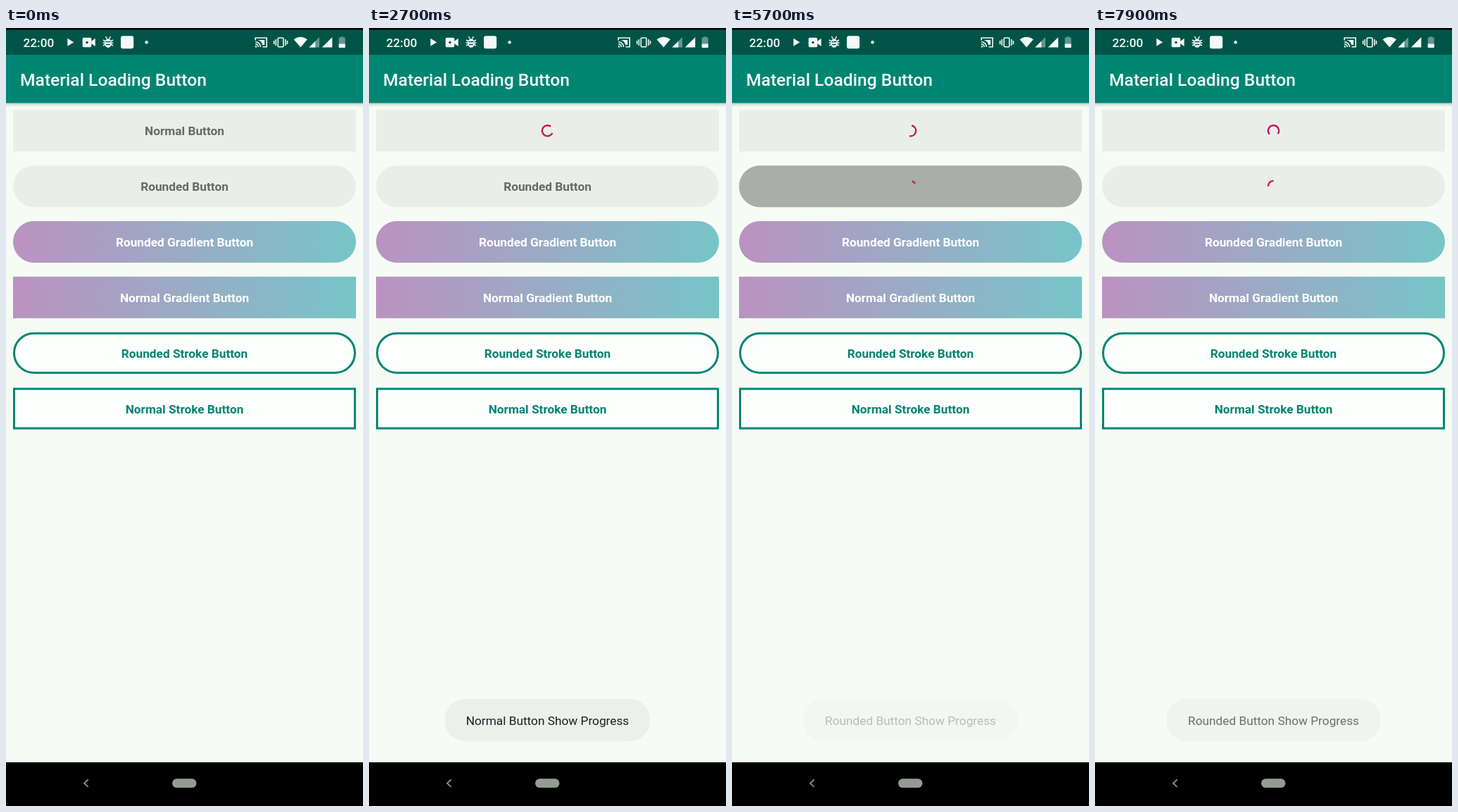
Animation, 507 px wide and 1104 px high, one loop 8 s. Source, as an HTML page:

```html
<!DOCTYPE html>
<html lang="en">
<head>
<meta charset="utf-8">
<title>Material Loading Button</title>
<style>
  html, body { margin: 0; width: 100%; height: 100%; overflow: hidden; background: #f6fbf6; }
  svg { display: block; width: 100%; height: 100%; }
  text { font-family: Roboto, "Noto Sans", sans-serif; font-size: 17.26px; }
  .label { font-weight: 700; text-anchor: middle; }
  .toast text { text-anchor: middle; fill: #1d1f1d; }
  .spinner { fill: none; stroke: #c8185c; stroke-width: 2.4; stroke-linecap: square; }
</style>
</head>
<body>
<svg id="stage" viewBox="0 0 507 1104" preserveAspectRatio="none">
  <defs>
    <linearGradient id="blend">
      <stop offset="0" stop-color="#bb92c1"/>
      <stop offset="1" stop-color="#77c5c8"/>
    </linearGradient>
    <linearGradient id="shade" x2="0" y2="1">
      <stop offset="0" stop-color="#4a6660" stop-opacity=".3"/>
      <stop offset="1" stop-color="#4a6660" stop-opacity="0"/>
    </linearGradient>
  </defs>

  <rect width="507" height="1104" fill="#f6fbf6"/>
  <rect y="106" width="507" height="6" fill="url(#shade)"/>
  <rect y="38" width="507" height="68.5" fill="#008573"/>
  <rect width="507" height="38" fill="#005548"/>
  <rect width="507" height="2.5" fill="#000"/>
  <text x="20" y="81.5" fill="#f4fbf8" style="font-size:24.65px;font-weight:500">Material Loading Button</text>

  <g id="status" fill="#f4faf7">
    <text x="24.5" y="26.7" style="font-weight:500">22:00</text>
    <path d="M87.3 14.8V25.8L96.3 20.3Z"/>
    <path d="M110.500 13.800H119.500Q121.300 13.800 121.300 15.600V18.800L126.700 14.800V26L121.300 22V25.400Q121.300 27.200 119.500 27.200H110.500Q108.700 27.200 108.700 25.400V15.600Q108.700 13.800 110.500 13.800Z"/>
    <circle cx="115" cy="20.500" r="1.800" fill="#005548"/>
    <g>
      <ellipse cx="145" cy="21.500" rx="4.800" ry="6.300"/>
      <path d="M141.500 12L143.500 15.500M148.500 12L146.500 15.500M138 17L152 25M152 17L138 25M137.600 21H152.400" fill="none" stroke="#f4faf7" stroke-width="1.500"/>
      <path d="M141.500 19.500H148.500M142 23.500H148" stroke="#005548" stroke-width="1.300"/>
    </g>
    <rect x="163" y="11.200" width="18.200" height="18" rx="3"/>
    <circle cx="199.600" cy="20.300" r="2.200"/>
    <g fill="none" stroke="#f4faf7" stroke-width="1.600">
      <path d="M354.200 17.500V14H370.200V26.800H364.500M354.200 19.700A7.300 7.300 0 0 1 361.500 27M354.200 22.900A4.100 4.100 0 0 1 358.300 27"/>
      <rect x="386.300" y="14" width="7.600" height="12.800" rx="1"/>
      <path d="M383.300 16V25M380.700 18V23M396.900 16V25M399.500 18V23"/>
    </g>
    <path d="M357.500 17H367.200V24H364.300A9 9 0 0 0 357.500 17ZM354 25A2.200 2.200 0 0 1 356.200 27.400H354Z"/>
    <path d="M408.700 16.300A14.500 14.500 0 0 1 427.900 16.300L418.300 27.500Z"/>
    <path d="M445 13V27.500H430.500Z" opacity=".4"/>
    <path d="M439.300 18.700V27.500H430.500Z"/>
    <path d="M463.300 13V27.500H448.800Z"/>
    <path d="M475.200 12.200H479.200V13.600H481.700V28H472.700V13.600H475.200Z" opacity=".4"/>
    <path d="M472.700 22.500H481.700V27Q481.700 28 480.700 28H473.700Q472.700 28 472.700 27Z"/>
  </g>

  <g id="buttons"></g>
  <g id="toasts"></g>

  <rect y="1042" width="507" height="62" fill="#000"/>
  <path d="M116.700 1066.500L111 1071.700L116.700 1077" fill="none" stroke="#949a93" stroke-width="1.700"/>
  <rect x="236" y="1065.300" width="34.500" height="12.800" rx="6.400" fill="#959b94"/>
</svg>

<script>
const LOOP = 8000, CX = 253.5, TEAL = '#008573';
const byId = id => document.getElementById(id);
const clamp = v => Math.min(1, Math.max(0, v));

function add(parent, tag, attrs, text) {
  const el = document.createElementNS('http://www.w3.org/2000/svg', tag);
  for (const k in attrs) el.setAttribute(k, attrs[k]);
  if (text) el.textContent = text;
  return parent.appendChild(el);
}

function addButton(name, row, kind) {
  const y = 116.3 + row * 78.85, mid = y + 29.5;
  const round = name.startsWith('Rounded');
  const inset = kind === 'stroke' ? 1.5 : 0;
  const box = {
    x: 10 + inset, y: y + inset, width: 487 - 2 * inset, height: 59 - 2 * inset,
    rx: round ? 29.5 - inset : 0
  };
  const paint = {
    plain: { fill: '#e9eee9' },
    blend: { fill: 'url(#blend)' },
    stroke: { fill: '#fdfffd', stroke: TEAL, 'stroke-width': 3 }
  }[kind];
  const ink = { plain: '#666a66', blend: '#fff', stroke: TEAL }[kind];
  const group = byId('buttons');
  add(group, 'rect', { ...box, ...paint });
  const press = kind === 'plain' && add(group, 'rect', { ...box, fill: '#a9aea8', opacity: 0 });
  const label = add(group, 'text', { class: 'label', x: CX, y: mid + 6.5, fill: ink }, name);
  return { mid, press, label };
}

function addToast(text, width) {
  const g = add(byId('toasts'), 'g', { class: 'toast', opacity: 0 });
  add(g, 'rect', { x: CX - width / 2, y: 952, width, height: 60.3, rx: 29, fill: '#ebf0ec' });
  add(g, 'text', { x: CX, y: 989 }, text);
  return g;
}

const kinds = ['plain', 'plain', 'blend', 'blend', 'stroke', 'stroke'];
const buttons = ['Normal Button', 'Rounded Button', 'Rounded Gradient Button',
  'Normal Gradient Button', 'Rounded Stroke Button', 'Normal Stroke Button']
  .map((name, i) => addButton(name, i, kinds[i]));

const loaders = [
  { at: 2160, ...buttons[0], toast: addToast('Normal Button Show Progress', 291) },
  { at: 5588, ...buttons[1], toast: addToast('Rounded Button Show Progress', 304) }
];
for (const l of loaders) l.arc = add(byId('buttons'), 'path', { class: 'spinner' });

// Cubic Bezier easing given by its x control values; y runs 0, 0, 1, 1.
function ease(x, x0, x1, x2, x3) {
  let lo = 0, hi = 1;
  for (let i = 0; i < 24; i++) {
    const s = (lo + hi) / 2, r = 1 - s;
    const bx = x0 * r ** 3 + 3 * x1 * s * r * r + 3 * x2 * s * s * r + x3 * s ** 3;
    if (bx < x) lo = s; else hi = s;
  }
  return lo * lo * (3 - 2 * lo);
}

// The head grows in the first half of a cycle, the tail follows in the second.
function arcPath(cy, t) {
  const R = 7.6, CYCLE = 1333, p = (t % CYCLE) / CYCLE;
  const head = p < .5 ? ease(p, 0, .2, .1, .5) : 1;
  const tail = p > .5 ? ease(p, .5, .7, .6, 1) : 0;
  const turn = 720 * t / 4444 + 90 * p - 90;
  const from = turn + 270 * tail;
  const to = Math.max(from + .5, turn + 270 * head);
  const point = deg => {
    const a = deg * Math.PI / 180;
    return `${(CX + R * Math.cos(a)).toFixed(3)} ${(cy + R * Math.sin(a)).toFixed(3)}`;
  };
  return `M${point(from)}A${R} ${R} 0 ${to - from > 180 ? 1 : 0} 1 ${point(to)}`;
}

function toastAlpha(t) {
  const enter = clamp(t / 500), exit = clamp((t - 1970) / 500);
  return (1 - (1 - enter) ** 2) * (1 - exit ** 2);
}

function render(t) {
  for (const l of loaders) {
    const dt = t - l.at, on = dt >= 0;
    l.label.setAttribute('visibility', on ? 'hidden' : 'visible');
    l.arc.setAttribute('visibility', on ? 'visible' : 'hidden');
    if (on) l.arc.setAttribute('d', arcPath(l.mid, dt));
    l.press.setAttribute('opacity', clamp((dt + 70) / 80) * clamp((450 - dt) / 300));
    l.toast.setAttribute('opacity', toastAlpha(dt - 38));
  }
}

const begin = performance.now();
function tick() {
  render((performance.now() - begin) % LOOP);
  requestAnimationFrame(tick);
}
render(0);
requestAnimationFrame(tick);
</script>
</body>
</html>
```
